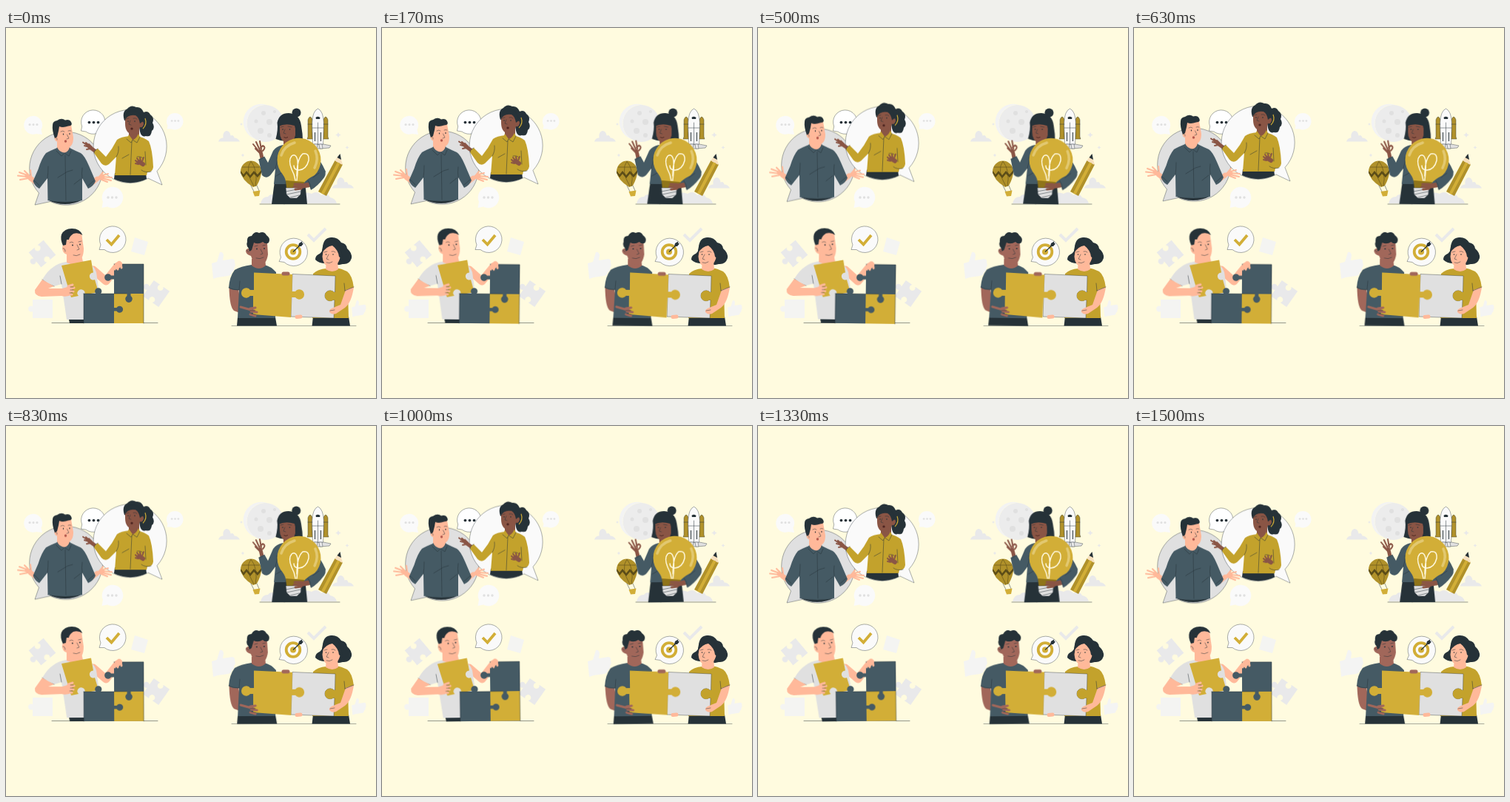
These frames come from a looping animation (500x500 px, 1.54 s). An HTML page:

```html
<!DOCTYPE html>
<html lang="en">
<head>
<meta charset="utf-8">
<title>Teamwork scenes</title>
<style>
html, body { margin: 0; height: 100%; overflow: hidden; background: #fffbdf; }
svg { display: block; width: 100vw; height: 100vh; }
.dk { fill: #263238; }
.bl { fill: #455a64; }
.gd { fill: #d2ae37; }
.sh { fill: #c3a22c; }
.ol { fill: #b0912a; }
.gr { fill: #e0e0e0; }
.pl { fill: #e9e9ea; }
.wt { fill: #fafafa; }
.pe { fill: #ffb99a; }
.br { fill: #8a5545; }
.tn { fill: #a1675a; }
.ln { fill: none; stroke: #263238; stroke-width: .5; stroke-linecap: round; stroke-linejoin: round; }
.ed { stroke: #263238; stroke-width: .4; stroke-linejoin: round; }
.lp, .lb, .lt { fill: none; stroke: #ffb99a; stroke-linecap: round; stroke-linejoin: round; }
.lb { stroke: #8a5545; }
.lt { stroke: #a1675a; }
.w2 { stroke-width: 2; }
.w3 { stroke-width: 3; }
.float { animation: float .77s cubic-bezier(.364, 0, .636, 1) -.08s infinite alternate; }
.sway { animation: sway .77s cubic-bezier(.364, 0, .636, 1) -.385s infinite alternate; }
#idea { transform-origin: 385px 180px; }
#build { transform-origin: 120px 335px; }
#carry { transform-origin: 345px 345px; }
@keyframes float { from { transform: translateY(.2px); } to { transform: translateY(-5.2px); } }
@keyframes sway { from { transform: rotate(-.9deg); } to { transform: rotate(.9deg); } }
</style>
</head>
<body>
<svg viewBox="0 0 500 500" preserveAspectRatio="none">
<defs>
  <path id="piece" d="M-13-13H-2.500A4 4 0 1 0 2.500-13H13V13H2.500A4 4 0 1 0-2.500 13H-13V2.500A4 4 0 1 1-13-2.500Z"/>
  <path id="star" d="M0-4Q.6-.6 4 0Q.6.6 0 4Q-.6.6-4 0Q-.6-.6 0-4Z"/>
  <path id="cloud" d="M-14.500 0Q-13-5-8-5Q-9-13-4-14.500Q1-15 2-8Q6-10 7-5Q12-5 14.500 0Z"/>
  <path id="thumb" d="M-16-4L-9-6L-5-19Q-1-20 0-15L-1-8L12-10Q16-9 15-5Q17-1 14 2Q15 6 11 8Q11 12 6 13L-8 15L-14 17Z"/>
  <g id="dots"><circle cx="-5.500" r="1.700"/><circle r="1.700"/><circle cx="5.500" r="1.700"/></g>
</defs>

<!-- conversation -->
<g class="wt">
  <path d="M49 144L41 143A12.500 12.500 0 1 1 47.500 137.500Z"/>
  <path d="M217.500 136.500L218.500 132A11.300 11.300 0 1 1 223.500 136.500Z"/>
  <path d="M129.500 243L131 235A14.300 14.300 0 1 1 137 241.500Z"/>
</g>
<g class="gr">
  <use href="#dots" transform="translate(37 130.500) scale(.9)"/>
  <use href="#dots" transform="translate(228.500 125.500) scale(.8)"/>
  <use href="#dots" transform="translate(143.500 229)"/>
</g>
<path fill="#fff" class="ed" d="M101.500 139L102.700 133A16.200 16.200 0 1 1 108 140Z"/>
<use href="#dots" class="dk" transform="translate(118.500 127.500) scale(1.100)"/>

<g class="float">
  <path class="gr ed" d="M39 239L44.500 223A49.500 49.500 0 1 1 60 234.500Z"/>
  <path class="wt ed" d="M211 212L204 193.500A49.500 49.500 0 1 0 192 203Z"/>

  <path class="dk" d="M56 232A49.500 49.500 0 0 0 103.500 232Z"/>
  <path class="lp" stroke-width="6.500" d="M44 211L33 203M114 211L123 204"/>
  <path class="lp" stroke-width="5" d="M34 203L28 200M122 204L131 201"/>
  <path class="lp w2" d="M30 203L19 205M29 201L16 199.500M29 199L18 195M31 199L25 193M34 200L33 192M127 204L137 208M130 203L142 206M131 201L143 202M130 199L138 197M126 201L131 195"/>
  <path class="bl" d="M69 162Q59 166 54 169Q48 176 43.500 191L36.500 207Q39 214 45 217L56 203L56.500 233Q80 237 103 233V203L111 217Q118 214 121 207L112 186Q106 172 101 169Q94 166 86 162Z"/>
  <path class="ln" d="M56 203Q57 196 57 187M103 203Q102 196 103 189M80 172L81 233M38 206Q41 208 45 213M111 213L119 206M70 202L83 194L90 192M92 211L101 204"/>
  <path class="pe" d="M69 151H86V164Q80 171 76 168Q70 168 69 163Z"/>
  <path class="bl" d="M69 161L68 168L75 173L79 169L85 173L88 166L86 161Q84 168 79 168.500Q72 168 69 161Z"/>
  <path class="ln" d="M68 166L75 173L79 169L85 173L88 166"/>
  <path class="pe" d="M70 135Q74 130 88 131L91 148Q91 161 82 162Q74 162 70 154Q64 152 66 146Z"/>
  <path class="dk" d="M66 149Q62 138 63 131Q63 126 69 125Q75 121 80 124.500Q86 123 88 127Q91 132 84 132.500Q77 135 72 133L71 139L69 147Z"/>
  <path class="ln" d="M74 140Q77 138 79 140M84 139Q86 138 88 139M82.500 144L85 149L82 150M67 148Q69 147 69 151"/>
  <ellipse class="dk" cx="77.500" cy="143.500" rx=".7" ry="1.100"/><ellipse class="dk" cx="86" cy="143" rx=".7" ry="1.100"/>
  <ellipse cx="80.500" cy="153" rx="1.700" ry="1.700" fill="#b4584d"/>

  <path class="dk" d="M147 196H189L190 204A49.500 49.500 0 0 1 146 204Z"/>
  <path class="dk" d="M160 125Q156 113 164 109Q169 103 176 107Q183 106 186 114Q192 111 195 117Q201 121 198 128Q202 135 197 139Q196 148 189 146Q183 148 181 140L178 122Z"/>
  <path class="lb" stroke-width="5" d="M123 168L113 161"/>
  <path class="lb w2" d="M114 163L109 164M113 161L106 159M112 160L104 154.500M114 160L108 155M116 161L112 157"/>
  <path class="sh" d="M167 146Q155 147 150 151Q144 163 135 174L124 163Q119 166 119 169L129 183Q134 188 139 184L149 174L147 199H190L191 195Q198 195 199 188Q198 164 193 153Q187 148 177 146Z"/>
  <path class="ln" d="M149 174Q153 168 152 160M189 185L188 167M170 153L168 198M119 169Q119 165 124 163M183 192Q188 196 196 194M157 176L166 171M177 174Q182 173 185 176"/>
  <path class="br" d="M166 134H180V147Q175 153 171 151Q166 150 166 146Z"/>
  <path class="sh" d="M166 144L163 150L169 155L171 151L177 155L181 147L179 143Q175 151 171 151Z"/>
  <path class="ln" d="M163 150L169 155L171 151L177 155L181 147"/>
  <path class="br" d="M161 122Q166 113 180 117L183 127Q186 125 186 130Q185 135 181 134Q179 144 171 144Q161 142 161 129Z"/>
  <path class="dk" d="M160 125Q159 112 171 111Q182 111 185 126L181 129Q180 121 175 118Q165 116 160 125Z"/>
  <path d="M188 122Q191 130 185 136" fill="none" stroke="#d2ae37" stroke-width="1.200"/>
  <path class="ln" d="M162 123L166 122M172 122Q175 121 177 123M168 125L166 130L169 131"/>
  <circle class="dk" cx="165" cy="126" r=".8"/><circle class="dk" cx="174" cy="126" r=".8"/>
  <ellipse cx="170" cy="136" rx="1.700" ry="1.500" fill="#4c2420"/>
  <path class="lb" stroke-width="6" d="M185 184L180 181"/>
  <path class="lb w2" d="M178 182L175 179M180 180L177 176M182 180L181 175M184 180L186 175M179 184L175 183"/>
</g>

<!-- idea -->
<circle cx="350.500" cy="129" r="25" fill="#ececec"/>
<path d="M337 150A25 25 0 0 1 353 104A24 24 0 0 0 337 150Z" fill="#f3f3f3"/>
<g class="gr"><circle cx="348" cy="115" r="3"/><circle cx="338" cy="126" r="2.500"/><circle cx="356" cy="127" r="4"/><circle cx="344" cy="139" r="4"/><circle cx="363" cy="113" r="2"/><circle cx="356" cy="145" r="3"/></g>
<g class="pl">
  <use href="#cloud" transform="translate(301.500 153.500)"/>
  <use href="#cloud" transform="translate(455.500 216.500)"/>
  <use href="#star" transform="translate(449 144.500)"/>
  <use href="#star" transform="translate(461 161.500) scale(.65)"/>
  <use href="#star" transform="translate(320 172) scale(.6)"/>
  <use href="#star" transform="translate(318 130) scale(.5)"/>
  <path d="M344 237Q346 228 354 228Q358 222 366 228V237ZM400 237V226Q405 220 413 224Q420 219 426 226Q434 222 438 229Q445 230 447 237Z"/>
</g>

<path class="gr ed" d="M414 157L412 163H425L437 162L439 159L429 157Z"/>
<path class="ol ed" d="M408 147V124Q411 116 414 124V147L415 150H407ZM429 147V124Q432 116 435 124V147L436 150H428Z"/>
<path class="wt ed" d="M414.500 157L413.500 130Q414 112 421.500 109Q429 112 429.500 130L428.500 157Z"/>
<path class="dk" d="M418.500 121Q421 118.500 424.500 121L424 123H419ZM417 141H418V153H417ZM425 141H426V153H425Z"/>
<path class="ln" d="M421.500 128V157M414 135H429M408 130H414M429 130H435"/>
<path class="pl ed" d="M416 157L415 163H420L421 157ZM423 157L424 163H428L427 157Z"/>

<path class="ol" d="M444.500 179L455 184.500L433 227L422 221Z"/>
<path class="gd" d="M448 181L451.500 183L429.500 225L426 223Z"/>
<path fill="#f6dfbd" d="M444.500 179L450.500 170.500L455 184.500Q452 185 451 182.500Q447 182 444.500 179Z"/>
<path class="dk" d="M447.500 175L451.500 170L453 178Z"/>

<path class="ol" d="M317 194A14 14.500 0 0 1 345 194Q345 202 339 213L334 215Q318 205 317 194Z"/>
<path fill="#5b4c18" d="M317 193L321 198L325 193L330 199L335 193L340 198L345 192L345 196L340 202L335 197L330 203L325 197L321 202L317 196Z"/>
<path d="M331 180Q322 192 335 214M331 180Q341 193 337 214M319 188H343" fill="none" stroke="#5b4c18" stroke-width=".6"/>
<path class="ln" d="M331 213L335 221M339 213L342 220"/>
<path class="gd" d="M333.500 221L343.500 219.500L342 227L336 227.500Z"/>
<path class="ln" d="M343 238H451"/>

<g id="idea" class="sway">
  <path class="dk" d="M363 207H404L407 238H359Z"/>
  <path class="lb" stroke-width="5" d="M346 176L344 167"/>
  <path class="lb w2" d="M342 167L334 157M343 165L338 154M345 164L343 153M347 166Q352 161 347 159L344 162M343 169L337 163"/>
  <path class="bl" d="M374 158Q365 160 361 166L354 182L349.500 174Q344 175 341.500 178L346 199Q352 205 358 198L364 190L362 211H404L416 211Q428 204 432 194Q424 176 413 166Q402 159 388 158Z"/>
  <path class="ln" d="M364 190Q367 182 366 175M341.500 178Q345 178 349.500 174M378 209L376 238M365 200L372 196"/>
  <circle class="dk" cx="392.500" cy="114.500" r="6"/>
  <path class="dk" d="M364.500 150Q368 137 366.500 128Q369 115 382 115Q397 116 399 132Q401 143 401 152Q392 155 384 153Q374 154 364.500 150Z"/>
  <path class="br" d="M375 148H388V160Q380 165 375 160Z"/>
  <path class="br" d="M370 127L391 129V145Q389 155 380 155Q370 153 370 141Z"/>
  <path class="dk" d="M368 133Q368 117 381 118Q393 119 392 140L390 132Q378 128 368 133Z"/>
  <path class="ln" d="M371 134L375 133M381 133L386 134M377 137L375 142L378 143"/>
  <circle class="dk" cx="374" cy="137" r=".8"/><circle class="dk" cx="383.500" cy="137" r=".8"/>
  <path d="M375.500 147.500Q378 149.500 381 147.500" fill="none" stroke="#512a24"/>
  <path class="gd" d="M378 207Q377 201 371 194A29.500 29.500 0 1 1 417 199Q407 204 403 209Z"/>
  <path d="M372 172Q376 159 390 155M418 166Q423 177 417 189" fill="none" stroke="#e2c870" stroke-width="3.500" stroke-linecap="round"/>
  <path d="M391 206Q390 198 386 191Q381 179 386 173Q392 169 394 179Q395 190 393 206M393 200Q393 177 401 170Q410 168 409 179Q406 191 396 192Q389 192 389 186" fill="none" stroke="#fff9df" stroke-width="1.500" stroke-linecap="round"/>
  <path fill="#8f741a" d="M378 206L403 208L400 217L379 216Z"/>
  <path class="gr ed" d="M378 216H399L398 225L393 230H384L379 225Z"/>
  <path class="ln" d="M378 221L398 217M379 225L398 221M384 229L396 226"/>
  <path class="lb" stroke-width="6.500" d="M409 212L397 214"/>
  <path class="lb w3" d="M399 211L390 211M398 214L389 214.500M399 217L391 218"/>
  <path class="bl" d="M408 206L429 190Q434 196 430 202Q421 214 412 219Z"/>
  <path class="ln" d="M408 206Q412 211 412 217M423 196L415 202"/>
</g>

<!-- building -->
<g class="pl">
  <use href="#piece" transform="translate(49 305) rotate(-40)"/>
  <use href="#piece" transform="translate(203 359) rotate(35)"/>
</g>
<g fill="#f4f4f2">
  <path d="M36 367H63V392H36V383A4 4 0 1 1 36 376Z"/>
  <path d="M174 283L192 289L187 307L169 302Z"/>
</g>
<path class="wt ed" d="M126 299.500L128 293A17.800 17.800 0 1 1 133 299.500Z"/>
<path d="M136 286L142.500 292.500L153 280" fill="none" stroke="#d2ae37" stroke-width="3.800"/>
<path class="ln" d="M62 398.500H205"/>

<g id="build" class="sway">
  <path class="dk" d="M84 389H107V399H86Z"/>
  <path class="lp" stroke-width="11" d="M118 327L135 342L151 322"/>
  <path class="gr" d="M81 316Q70 318 64 323Q56 328 49 340L65 349L75 346L82 394H107L126 358L122 330Q118 318 105 315Z"/>
  <path class="ln" d="M75 346L73 335M49 340Q57 347 65 349"/>
  <path class="pe" d="M82 302H101L104 316Q94 323 82 317Z"/>
  <path class="pe" d="M79 283Q84 275 102 277L105 298Q105 314 95 315Q86 315 82 306Q76 304 76 297Z"/>
  <path class="dk" d="M77 294Q73 285 75 279Q79 271 89 271Q100 271 103.500 280Q98 276 91 278Q86 281 85 286L82 286L81 293Z"/>
  <path class="ln" d="M86 290Q89 288 91 290M98 289L102 288M96 293L99 299L96 300M91 307Q95 309 100 306M77 298Q80 297 80 302"/>
  <circle class="dk" cx="90" cy="293.500" r=".9"/><circle class="dk" cx="100" cy="292.500" r=".9"/>
  <path class="pe" d="M49 340L65 349L57 352H80Q91 343 93 350Q94 357 88 361Q80 364 75 362L48 363Q38 362 39 354Z"/>
  <path class="gd" d="M75 321L115 313.500L118 330.500A5 5 0 1 0 120 340L125 357L106 360.500A5 5 0 1 0 98 362L88 364Z"/>
  <path class="lp" stroke-width="9" d="M78 356L85 354"/>
  <path class="lp w3" d="M84 349L90 347M86 352L92 351M86 355L91 356M84 359L89 360"/>
  <path class="ln" d="M87 350H91M87 354H91M86 358H90"/>
  <path class="bl" d="M105 359H121.500A4.600 4.600 0 1 1 128 359H146V399H105Z"/>
  <path class="gd" d="M146 359H186V399H146Z"/>
  <path class="bl" d="M145.500 378H149.500A4.600 4.600 0 1 1 149.500 382.500H145.500Z"/>
  <path class="bl" d="M146 319H186V359H168.500V362A4.800 4.800 0 1 1 163.500 362V359H146V339.500H142A4.800 4.800 0 1 1 142 334.500H146Z"/>
  <path class="ln" d="M105 359H121M128 359H163M146 319H186V399M105 359V399"/>
  <path class="lp" stroke-width="8" d="M150 322L153 319"/>
  <path class="lp w3" d="M148 320L147 326M151 320L151 326M155 318L156 324"/>
</g>

<!-- carrying -->
<g fill="#f4f4f3">
  <use href="#thumb" transform="translate(294 322)"/>
  <use href="#thumb" transform="translate(477 380) scale(.62)"/>
</g>
<path d="M408 279L416 287L432 271" fill="none" stroke="#e9e9ea" stroke-width="4"/>
<path class="wt ed" d="M369 315.500L371.500 310A18.700 18.700 0 1 1 376 316.500Z"/>
<circle cx="388" cy="302.500" r="9.300" fill="none" stroke="#d2ae37" stroke-width="3.800"/>
<circle cx="388" cy="302.500" r="4" class="gd"/>
<path d="M388 302.500L398 293" stroke="#263238" stroke-width="1.100"/>
<path class="dk" d="M395 295L396 291L400 288.500L400.500 291L402 291.500L399 295Z"/>
<path class="ln" d="M305 402.700H473"/>

<path class="dk" d="M415 390H463L465 402.500H413.500Z"/>
<path class="dk" d="M428 298Q428 284 439 283Q448 282 453 290Q460 291 461 298Q468 304 467 311Q464 320 455 319Q445 322 435 318Q423 319 418 313Q418 308 422 306Q427 304 428 298Z"/>
<path class="sh" d="M433 325Q421 326 415 332L414 392H463L462 356L470 351Q468 334 461 329Q453 325 446 324Z"/>
<path class="pe" d="M433 315H448L449 326Q441 332 432 326Z"/>
<path class="pe" d="M429 298Q438 288 450 297L452 308Q449 323 438 323Q428 321 427.500 309Z"/>
<path class="dk" d="M427 304Q427 286 440 286Q453 288 455 313L450 309Q449 300 441 294Q433 295 427 304Z"/>
<path class="ln" d="M430 303L434 302M440 302Q443 301 445 303M436 306L433 312L436 313M433 317Q437 319 441 316"/>
<circle class="dk" cx="432.500" cy="306" r=".8"/><circle class="dk" cx="442" cy="306" r=".8"/>
<path class="gr ed" d="M387 332.500L445 335L444.500 357H443A7 7 0 1 0 442 367.500H444L443 392L385 390Z"/>
<path class="sh" d="M445 357H443A7 7 0 1 0 442 367.500H445Z"/>
<path class="pe" d="M459 354L470 350Q467 371 458 378L446 386Q440 388 437 384Q436 380 442 378L452 374Z"/>
<path class="ln" d="M458 355L470 350M458 355L457 345M438 382L444 381"/>
<path class="lp" stroke-width="5" d="M393 390.500L398 390"/>

<g id="carry" class="sway">
  <path class="dk" d="M313 391H364L366 402.500H312Z"/>
  <path class="tn" d="M301.500 350L314 352L317 373L333 376Q341 380 340 387Q337 392 329 390L308 382Q302 377 301.500 350Z"/>
  <path class="bl" d="M332 320Q317 322 309 327Q302 336 301 351Q306 355 315 354L313 392H364L365 330Q358 322 349 320Z"/>
  <path class="ln" d="M315 354L316 342M301 351Q307 354 315 354"/>
  <path class="tn" d="M332 312H350L351 321Q342 329 332 321Z"/>
  <path class="tn" d="M330 291Q339 285 353 291L354 306Q352 320 343 320Q334 319 331 308Q324 306 324 301Q326 296 330 299Z"/>
  <path class="dk" d="M329 302L328 298Q324 294 326 289Q325 281 332 281Q336 274 342 277Q349 274 352 280Q358 284 355 290Q351 293 347 289Q341 293 335 290L332 300Z"/>
  <path class="ln" d="M336 295L340 294M347 294L351 293M344 299L347 305L344 306M338 311Q343 313 348 310M325 300L328 303"/>
  <circle class="dk" cx="339" cy="298.500" r=".9"/><circle class="dk" cx="349" cy="298" r=".9"/>
  <path class="gd" d="M335 330.500L387 333L386.500 356H391A6.700 6.700 0 1 1 391 364H386L385 391L334 387V362H330A6.700 6.700 0 1 1 330 354H335Z"/>
  <path class="lt w3" d="M317 377L335 382M330 379L337 378M331 383L339 384M330 387L337 389"/>
  <path class="ln" d="M330 382L337 382M331 386L337 387"/>
  <path class="lt" stroke-width="5" d="M375 332L381 332"/>
</g>
</svg>
</body>
</html>
```
